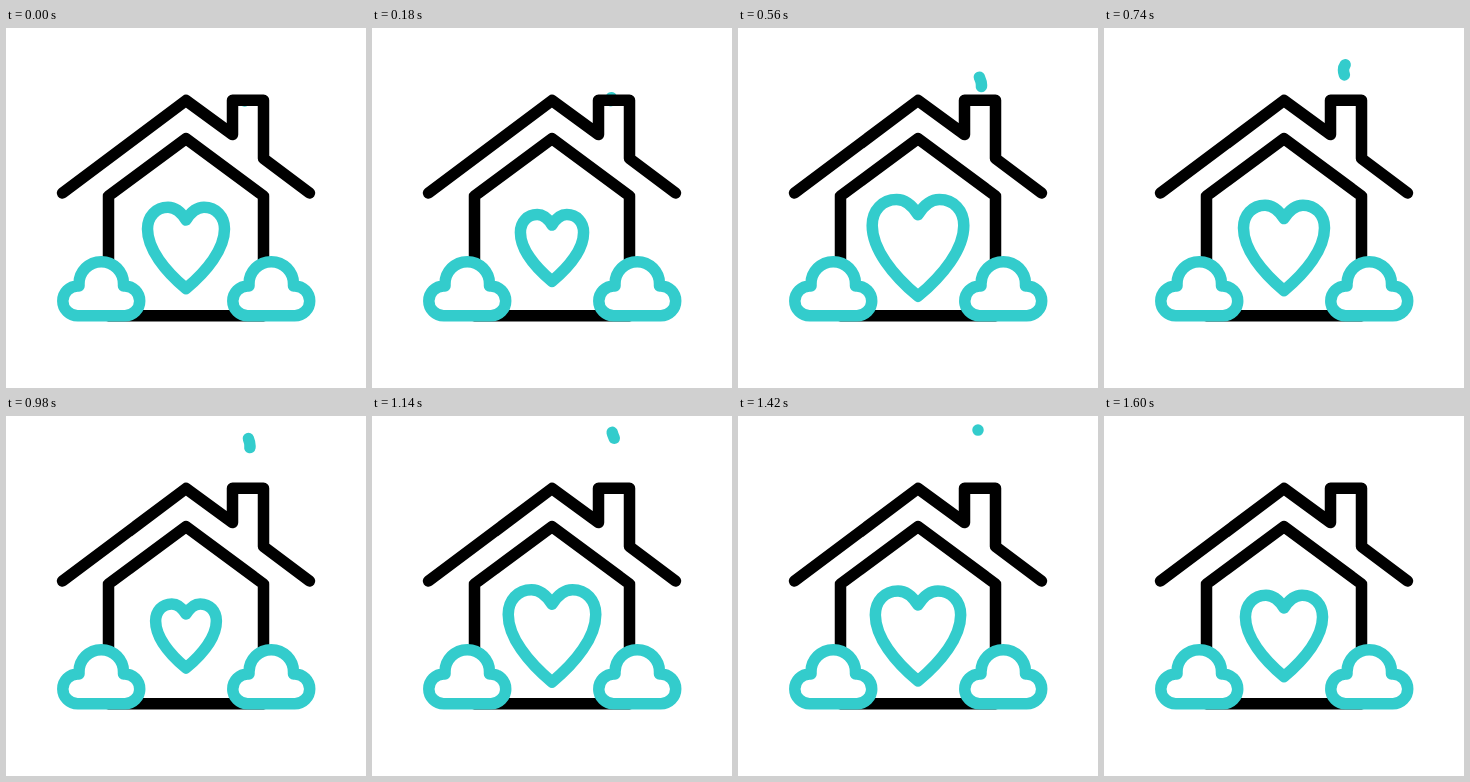
An HTML page that plays this animation: 360x360 px, repeating every 1620 ms.

```html
<!DOCTYPE html>
<html lang="en">
<head>
<meta charset="utf-8">
<title>Home with a beating heart</title>
<style>
  html, body { margin: 0; width: 100%; height: 100%; overflow: hidden; background: #fff; }
  svg { display: block; width: 100%; height: 100%; }
  path, use { fill: none; stroke-width: 11.5; stroke-linecap: round; stroke-linejoin: round; }
  .ink { stroke: #000; }
  .teal { stroke: #33cccc; }
  #cloud { fill: #fff; }
  #heart {
    vector-effect: non-scaling-stroke;
    transform-origin: 180px 220px;
  }
</style>
</head>
<body>
<svg viewBox="0 0 360 360">
  <path id="smoke" class="teal" pathLength="100"
    d="M238.5 73C240 66 243.5 62 243.5 57C243.5 51 239.5 48 239.5 42C239.5 36 244 36 244 30C244 23 240 20 240 14"/>
  <path class="ink" d="M56.5 165L180 72.5L226.5 106.5V72.2H257.5V130.5L303.5 165"/>
  <path class="ink" d="M102.5 287.8V168L180 110.7L257.5 168V287.8Z"/>
  <path id="cloud" class="teal"
    d="M73 258H71.7A14.9 14.9 0 0 0 71.7 287.8H118.8A14.9 14.9 0 0 0 118.8 258H117.5V255.9A22.25 22.25 0 0 0 73 255.9Z"/>
  <use href="#cloud" x="170"/>
  <path id="heart" class="teal"
    d="M180 192C175 184 169.5 179.3 162 179.3C150 179.3 141.5 188.5 141.5 201C141.5 221 159 243 180 260.5C201 243 218.5 221 218.5 201C218.5 188.5 210 179.3 198 179.3C190.5 179.3 185 184 180 192Z"/>
</svg>
<script>
  const LOOP = 1620;
  const smoke = document.getElementById('smoke');
  const heart = document.getElementById('heart');

  // [time in ms, scale]
  const beats = [[0, 1], [278, .75], [613, 1.22], [930, .75], [1218, 1.22], [LOOP, 1]];

  // Smooth 0..1 progress between two times
  function ease(t, from, to) {
    const u = Math.min(1, Math.max(0, (t - from) / (to - from)));
    return u * u * (3 - 2 * u);
  }

  function beatScale(t) {
    const i = beats.findIndex(b => b[0] > t);
    const [t0, s0] = beats[i - 1];
    const [t1, s1] = beats[i];
    return s0 + (s1 - s0) * ease(t, t0, t1);
  }

  function draw() {
    const t = performance.now() % LOOP;
    heart.style.transform = `scale(${beatScale(t)})`;

    const head = 100 * ease(t, 0, 1290);
    const tail = 100 * ease(t, 133, 1450);
    smoke.style.strokeDasharray = `${Math.max(.01, head - tail)} 300`;
    smoke.style.strokeDashoffset = -Math.min(tail, 99.9);
    smoke.style.visibility = t < 1450 ? 'visible' : 'hidden';

    requestAnimationFrame(draw);
  }
  draw();
</script>
</body>
</html>
```
